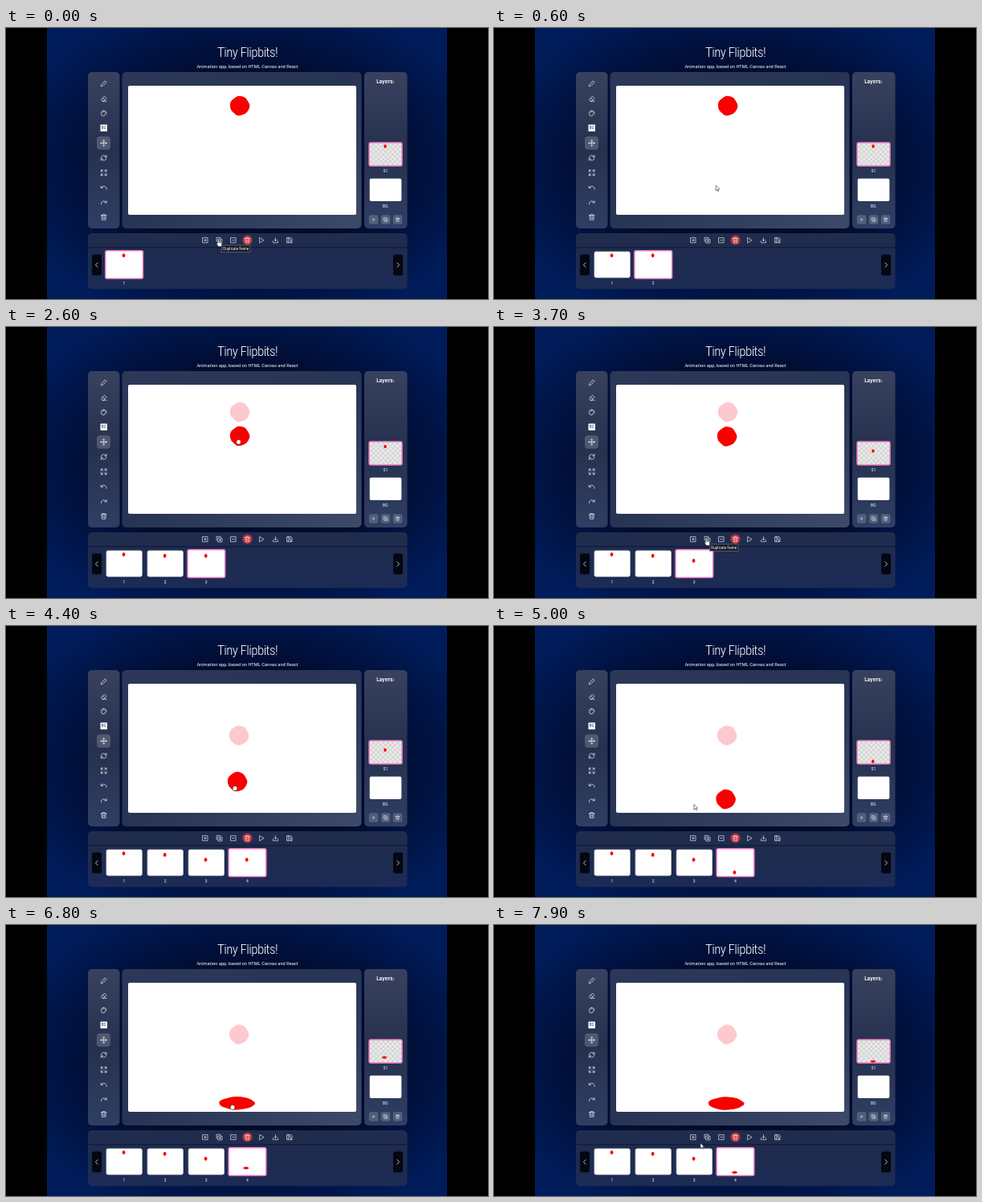
Write an HTML page that moves like this. It is 600x338 px and loops after 8000 ms.

```html
<!DOCTYPE html>
<html lang="en">
<head>
<meta charset="utf-8">
<title>Animation app</title>
<style>
  html, body { margin: 0; width: 100%; height: 100%; overflow: hidden; background: #000; }
  svg { display: block; width: 600px; height: 338px; }
  text { fill: #fff; text-anchor: middle; font: 5px Roboto, sans-serif; }
  .title { font: 300 17px "Roboto Condensed", Roboto, sans-serif; font-stretch: condensed; letter-spacing: -.6px; }
  .sub { font-size: 5.7px; }
  .layers { font: 700 6.2px Inter, sans-serif; }
  .small { font-size: 4.5px; }
  .icon { fill: none; stroke: #fff; stroke-width: 1.8; stroke-linecap: round; stroke-linejoin: round; }
  .thumb rect { fill: #fff; stroke: #dfe6e2; stroke-width: .7; }
  .thumb.on rect { stroke: #f27fc6; stroke-width: 1.5; }
  .cursor { fill: #fff; stroke: #333; stroke-width: .6; stroke-linejoin: round; }
</style>
</head>
<body>
<svg viewBox="0 0 600 338">
  <defs>
    <radialGradient id="sky" r="62%">
      <stop offset="0" stop-color="#010a26"/>
      <stop offset=".55" stop-color="#010b2e"/>
      <stop offset="1" stop-color="#001c5a"/>
    </radialGradient>
    <linearGradient id="glass" x2="1" y2="1">
      <stop offset="0" stop-color="#2d3859"/>
      <stop offset=".5" stop-color="#283453"/>
      <stop offset="1" stop-color="#3d4a69"/>
    </linearGradient>
    <linearGradient id="side" x2="0" y2="1">
      <stop offset="0" stop-color="#38425f"/>
      <stop offset=".5" stop-color="#26314f"/>
      <stop offset="1" stop-color="#2f3e63"/>
    </linearGradient>
    <linearGradient id="dock" x2="0" y2="1">
      <stop offset="0" stop-color="#202c4c"/>
      <stop offset="1" stop-color="#1c2b55"/>
    </linearGradient>
    <pattern id="checks" width="6" height="6" patternUnits="userSpaceOnUse">
      <rect width="6" height="6" fill="#e9e9e9"/>
      <path fill="#d6d6d6" d="M0 0h3v6h3v-3h-6z"/>
    </pattern>
    <clipPath id="paper"><rect x="152" y="72" width="284" height="161" rx="2"/></clipPath>

    <!-- Icons, centred on the origin in a 24 unit box -->
    <path id="pencil" d="M5-9l4 4L-4 8l-5 1 1-5z"/>
    <path id="eraser" d="M-4 9l-5-5L2-8l7 7-10 10zM-4-2l7 7M-4 9H9"/>
    <path id="palette" d="M0-9a9 9 0 1 0 0 18c3 0 1-3 3-5s6 0 6-4a9 9 0 0 0-9-9zM-4-3v.1M0-5v.1M4-3v.1"/>
    <path id="arm" d="M0 0V-10M-3-7l3-3 3 3"/>
    <g id="half"><use href="#arm"/><use href="#arm" transform="rotate(90)"/></g>
    <g id="move"><use href="#half"/><use href="#half" transform="rotate(180)"/></g>
    <path id="corner" d="M-9-3V-9H-3M-9-9l6 6"/>
    <g id="corners"><use href="#corner"/><use href="#corner" transform="rotate(90)"/></g>
    <g id="scale"><use href="#corners"/><use href="#corners" transform="rotate(180)"/></g>
    <path id="turn" d="M-9-1a9 9 0 0 1 15-5l3 3M9-9v6H3"/>
    <g id="rotate"><use href="#turn"/><use href="#turn" transform="rotate(180)"/></g>
    <path id="undo" d="M-9-5v6h6M9 6a9 9 0 0 0-15-8l-3 3"/>
    <use id="redo" href="#undo" transform="scale(-1 1)"/>
    <path id="trash" d="M-9-6H9M-4-6v-3h8v3M-7-6l1 15H6l1-15M-2-1v5M2-1v5"/>
    <path id="minus" d="M-9-9H9V9H-9zM-4 0h8"/>
    <path id="plus" d="M0-6V6M-6 0H6"/>
    <path id="add" d="M-9-9H9V9H-9zM0-4v8M-4 0h8"/>
    <path id="copy" d="M-4-4h14v14H-4zM-8 4h-2v-14H4v3M3 0v6M0 3h6"/>
    <path id="play" d="M-6-9L9 0-6 9z"/>
    <path id="download" d="M-9 3v6H9V3M-5-2l5 5 5-5M0 3V-9"/>
    <path id="save" d="M-9-9H5l4 4V9H-9zM-5 9V1H5v8M-5-9v5h8"/>
    <path id="left" d="M3-7l-7 7 7 7"/>
    <use id="right" href="#left" transform="scale(-1 1)"/>

    <path id="arrow" d="M0 0v6.6l1.6-1.4 1 2.3 1.1-.5-1-2.2h2z"/>
    <path id="hand" d="M-1.8-4c0-1 1.4-1 1.4 0v2.6l2.6.5q1 .3.9 1.3L2.6 4h-3.8L-3.2.8c-.5-.9.6-1.4 1.4-.4z"/>
    <path id="fist" d="M-2.2-1.8q2-1.4 4.2 0 1 0 .9 1.6L2 3.2h-3.4L-3 1.2Q-3.3-.2-2.2-.2z"/>
    <path id="disc"/>
  </defs>

  <rect x="51" width="498" height="338" fill="url(#sky)"/>
  <text class="title" x="300.5" y="36">Tiny Flipbits!</text>
  <text class="sub" x="300.5" y="49.5">Animation app, based on HTML Canvas and React</text>

  <rect x="102" y="55" width="39.5" height="195" rx="5" fill="url(#side)"/>
  <rect x="144.5" y="55" width="298" height="195" rx="5" fill="url(#glass)"/>
  <rect x="446" y="55" width="53.5" height="195" rx="5" fill="url(#side)"/>
  <rect x="102" y="256" width="397.5" height="69.5" rx="5" fill="url(#dock)"/>
  <rect x="102" y="273.4" width="397.5" height="1" fill="#0b1737"/>

  <rect id="pick" x="113" width="17" height="16.5" rx="4" fill="#fff" opacity=".19"/>
  <rect x="117.5" y="120.5" width="8.5" height="8.5" rx=".5" fill="#fff"/>
  <text class="small" x="121.7" y="126.4" style="fill:#26314f">BG</text>

  <rect x="152" y="72" width="284" height="161" rx="2" fill="#fff"/>
  <g clip-path="url(#paper)">
    <use id="ghost" href="#disc" fill="#fcc9ce"/>
    <use id="ball" href="#disc" fill="#f80000"/>
  </g>

  <text class="layers" x="472.3" y="69">Layers:</text>
  <rect x="452" y="143" width="41" height="29" rx="2" fill="url(#checks)" stroke="#f27fc6" stroke-width="1.4"/>
  <use id="layerBall" href="#disc" fill="#f80000"/>
  <text x="472.3" y="179.8">S1</text>
  <rect x="452.7" y="187.7" width="39.6" height="28.3" rx="2" fill="#fff"/>
  <text x="472.3" y="223.8">BG</text>

  <circle cx="300.5" cy="264.6" r="6" fill="#bd3540"/>
  <rect x="107" y="282.5" width="12" height="26" rx="2.5" fill="#030712"/>
  <rect x="482" y="282.5" width="12" height="26" rx="2.5" fill="#030712"/>
  <g id="parts"></g>
  <g id="tip">
    <rect x="268.5" y="271" width="35.5" height="8.5" fill="#151a26" stroke="#8b90a0" stroke-width=".5"/>
    <text class="small" x="286.2" y="276.9">Duplicate frame</text>
  </g>
  <use id="cursor" class="cursor"/>
</svg>
<script>
const LOOP = 8000;
const el = id => document.getElementById(id);
const parts = el('parts');
const add = markup => parts.insertAdjacentHTML('beforeend', markup);
const icon = (name, x, y, k) =>
  add(`<use class="icon" href="#${name}" transform="translate(${x} ${y}) scale(${k})"/>`);

// Slightly uneven hand-drawn disc of radius 1
const rim = Array.from({ length: 28 }, (_, i) => {
  const a = i / 14 * Math.PI, r = 1 + .025 * Math.sin(4 * a + 1) + .015 * Math.cos(7 * a);
  return `${r * Math.cos(a)} ${r * Math.sin(a)}`;
});
el('disc').setAttribute('d', `M${rim.join('L')}z`);

const toolY = i => 69.5 + i * 18.5;
const thumbX = i => 125 + i * 51.1;

'pencil eraser palette - move rotate scale undo redo trash'.split(' ')
  .forEach((name, i) => icon(name, 121.7, toolY(i), .37));
'add copy minus trash play download save'.split(' ')
  .forEach((name, i) => icon(name, 248 + i * 17.5, 264.7, .34));
['plus', 'copy', 'trash'].forEach((name, i) => {
  const x = 457.5 + i * 15;
  add(`<rect x="${x - 5.7}" y="233.2" width="11.5" height="11.5" rx="2.5" fill="#fff" opacity=".18"/>`);
  icon(name, x, 239, .25);
});
icon('left', 113, 295.5, .4);
icon('right', 488, 295.5, .4);
for (let i = 0; i < 4; i++) {
  add(`<g class="thumb" id="thumb${i}"><rect rx="2"/><use id="mini${i}" href="#disc" fill="#f80000"/>
    <text x="${thumbX(i) + 22}" y="319.8">${i + 1}</text></g>`);
}

const starts = [0, 300, 1950, 3750];
const tips = [[0, 450], [1880, 2080], [3500, 3850]];
const points = [[0, 450], [1850, 2080], [3450, 3850], [5550, 5940], [6480, 6570]];
const grabs = [[900, 1150], [2350, 2700], [4100, 4700], [6100, 6350], [6720, 6950]];

// Ball shifts: start, end, dx, dy
const shifts = [
  [900, 1150, 0, 9], [2350, 2600, 0, 30], [2600, 2700, -1, .5], [4100, 4400, -2, 57.5],
  [4400, 4600, .5, 22], [6720, 6800, 3.5, 27.2], [6800, 6950, 1.5, .3]
];

// Cursor stops: time, x, y
const button = [265.5, 268.5];
const stops = [
  [0, ...button], [450, ...button], [800, 290, 101], [900, 290, 101], [1150, 290, 110],
  [1450, 295, 165], [1550, 295, 165], [1850, ...button], [2080, ...button],
  [2350, 289, 113], [2600, 289.5, 143], [2700, 288.5, 143], [3000, 287, 150],
  [3450, ...button], [3850, ...button], [4100, 287, 144], [4400, 285, 202], [4600, 285, 224],
  [5100, 240, 222], [5550, 128, 207], [5700, 118, 202.5], [5850, 121, 183], [5940, 121, 183],
  [6100, 282, 215], [6300, 305, 205], [6480, 121, 146], [6570, 121, 146],
  [6720, 279, 200], [6800, 282, 227], [7300, 284, 228], [7800, 257, 272], [LOOP, 257, 272]
];

const progress = (t, a, b) => Math.min(1, Math.max(0, (t - a) / (b - a)));
const within = (spans, t) => spans.some(([a, b]) => t >= a && t < b);
const show = (id, on) => { el(id).style.display = on ? '' : 'none'; };

function poseAt(t) {
  let x = 291, y = 97;
  const s = progress(t, 6100, 6300), kx = 1 + .83 * s, ky = 1 - .33 * s;
  for (const [a, b, dx, dy] of shifts) {
    const p = progress(t, a, b);
    // Scaling acts about the middle of the paper
    if (a === 6720) {
      x = 294 + (x - 294) * kx;
      y = 152.5 + (y - 152.5) * ky;
    }
    x += dx * p;
    y += dy * p;
  }
  return [x, y, 12 * kx, 12 * ky];
}

function cursorAt(t) {
  const i = stops.findIndex(s => s[0] > t), a = stops[i - 1], b = stops[i];
  const p = progress(t, a[0], b[0]);
  return [a[1] + (b[1] - a[1]) * p, a[2] + (b[2] - a[2]) * p];
}

function put(id, [x, y, rx = 1, ry = 1]) {
  el(id).setAttribute('transform', `translate(${x} ${y}) scale(${rx} ${ry})`);
}

// Maps a pose on the paper into a small preview box
function shrink([x, y, rx, ry], left, top, w, h) {
  const kx = w / 284, ky = h / 161;
  return [left + (x - 152) * kx, top + (y - 72) * ky, rx * kx, ry * ky];
}

function draw(t) {
  const active = starts.filter(s => s <= t).length - 1;
  const saved = poseAt(Math.max(0, ...grabs.map(g => g[1]).filter(end => end <= t)));

  put('ball', poseAt(t));
  put('ghost', poseAt(starts[active]));
  put('layerBall', shrink(saved, 452, 143, 41, 29));
  show('ghost', active > 0);

  starts.forEach((_, i) => {
    const on = i === active, grow = on ? 1.2 : 0, x = thumbX(i), thumb = el('thumb' + i);
    const box = { x: x - grow, y: 279 - grow, width: 44.3 + 2 * grow, height: 32.2 + 2 * grow };
    show('thumb' + i, i <= active);
    thumb.classList.toggle('on', on);
    for (const key in box) thumb.firstChild.setAttribute(key, box[key]);
    put('mini' + i, shrink(on ? saved : poseAt(starts[i + 1] ?? t), x, 278.7, 44, 32));
  });

  el('pick').setAttribute('y', toolY(t >= 5900 && t < 6550 ? 6 : 4) - 8.3);
  show('tip', within(tips, t));
  el('cursor').setAttribute('href', within(grabs, t) ? '#fist' : within(points, t) ? '#hand' : '#arrow');
  put('cursor', cursorAt(t));
}

function tick() {
  draw(performance.now() % LOOP);
  requestAnimationFrame(tick);
}
tick();
</script>
</body>
</html>
```
